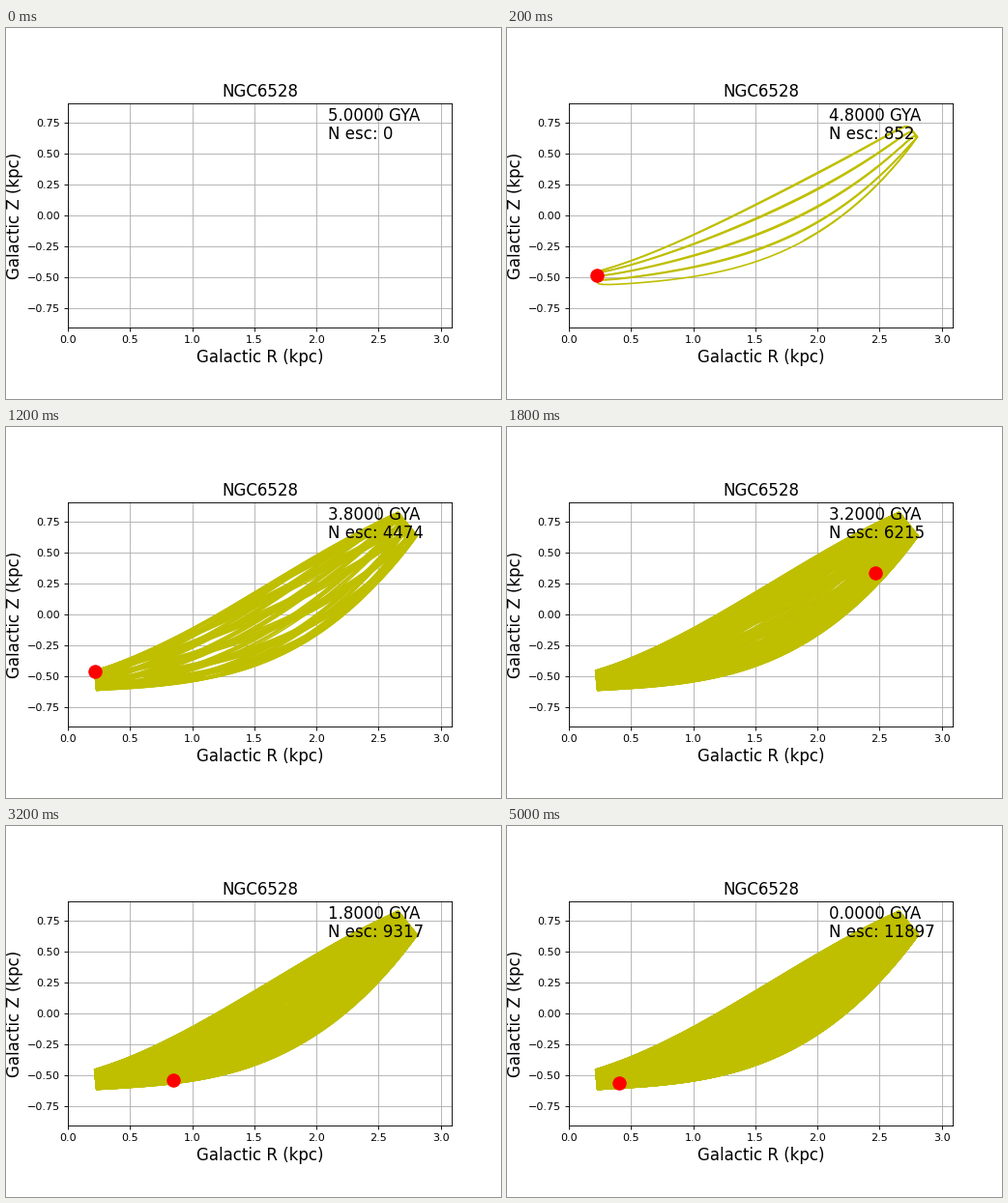
Write a matplotlib script that moves like this. It is 512 px wide and 384 px high and loops after 5.1 s.

```python
import numpy as np
import matplotlib.pyplot as plt
from matplotlib.animation import FuncAnimation
from matplotlib.patches import Rectangle

FRAMES = 51
INTERVAL = 100
STEPS = 600          # orbit samples per frame
FONT = 15

# Angular speeds (radians per frame) along and across the orbit's region.
ALONG_RATE, ALONG_START = 15.024, -1.448
ACROSS_RATE, ACROSS_START = 13.939, 2.69

# Curved lower and upper edges of that region, each through four points.
LOW = np.polyfit([0.235, 1.0, 2.0, 2.805], [-0.608, -0.54, -0.165, 0.63], 3)
HIGH = np.polyfit([0.22, 1.0, 2.1, 2.656], [-0.455, -0.115, 0.53, 0.817], 3)

plt.rcParams["font.family"] = "DejaVu Sans"


def ease(c):
    return np.sin(np.pi / 2 * c)


def orbit(t):
    """Two oscillations of nearly equal speed, bent into the curved region."""
    along = (1 + ease(ease(np.cos(ALONG_START + ALONG_RATE * t)))) / 2
    across = (1 + np.cos(ACROSS_START + ACROSS_RATE * t)) / 2
    r_low = 0.235 + 2.57 * along
    r_high = 0.22 + 2.436 * along
    z_low, z_high = np.polyval(LOW, r_low), np.polyval(HIGH, r_high)
    return (r_low + across * (r_high - r_low),
            z_low + across * (z_high - z_low))


def escaped(i):
    return round(15930 * (1 - np.exp(-i / 36.4)))


fig = plt.figure(figsize=(6.4, 4.8), dpi=80)
back = fig.add_artist(Rectangle((0, 0), 1, 1, transform=fig.transFigure,
                                lw=0, zorder=-5))
ax = fig.add_subplot(facecolor="none")
ax.set_aspect("equal")
ax.set_xlim(0, 3.087)
ax.set_ylim(-0.902, 0.902)
ax.set_xticks(np.arange(0, 3.1, 0.5))
ax.set_yticks(np.arange(-0.75, 0.8, 0.25))
ax.grid(True)
ax.set_title("NGC6528", fontsize=FONT)
ax.set_xlabel("Galactic R (kpc)", fontsize=FONT)
ax.set_ylabel("Galactic Z (kpc)", fontsize=FONT)

trails = []
for k in range(FRAMES - 1):
    trails += ax.plot(*orbit(np.linspace(k, k + 1, STEPS + 1)))
marker, = ax.plot([], [], "o", ms=12, zorder=2.2)
age_text = ax.text(2.09, 0.765, "", fontsize=FONT)
esc_text = ax.text(2.09, 0.617, "", fontsize=FONT)
grid_lines = ax.get_xgridlines() + ax.get_ygridlines()


def paint(dim):
    back.set_facecolor("#939393" if dim else "white")
    marker.set_color("#1c1c1c" if dim else "red")
    for line in grid_lines:
        line.set_color("#6c6c6c" if dim else "#b0b0b0")
    for line in trails:
        line.set_color("#333333" if dim else "#bfbf00")


def update(i):
    paint(dim=i == 1)
    for k, line in enumerate(trails):
        line.set_visible(k < i)
        # older passes look heavier than the newest ones
        line.set_linewidth(1.5 if i - k < 3 else 2.4)
    r, z = orbit(i)
    marker.set_data([r], [z])
    marker.set_visible(i > 0)
    age_text.set_text(f"{(50 - i) / 10:.4f} GYA")
    esc_text.set_text(f"N esc: {escaped(i)}")


anim = FuncAnimation(fig, update, frames=FRAMES, interval=INTERVAL,
                     init_func=lambda: update(0), repeat=True,
                     repeat_delay=0, blit=False)
plt.show()
```
